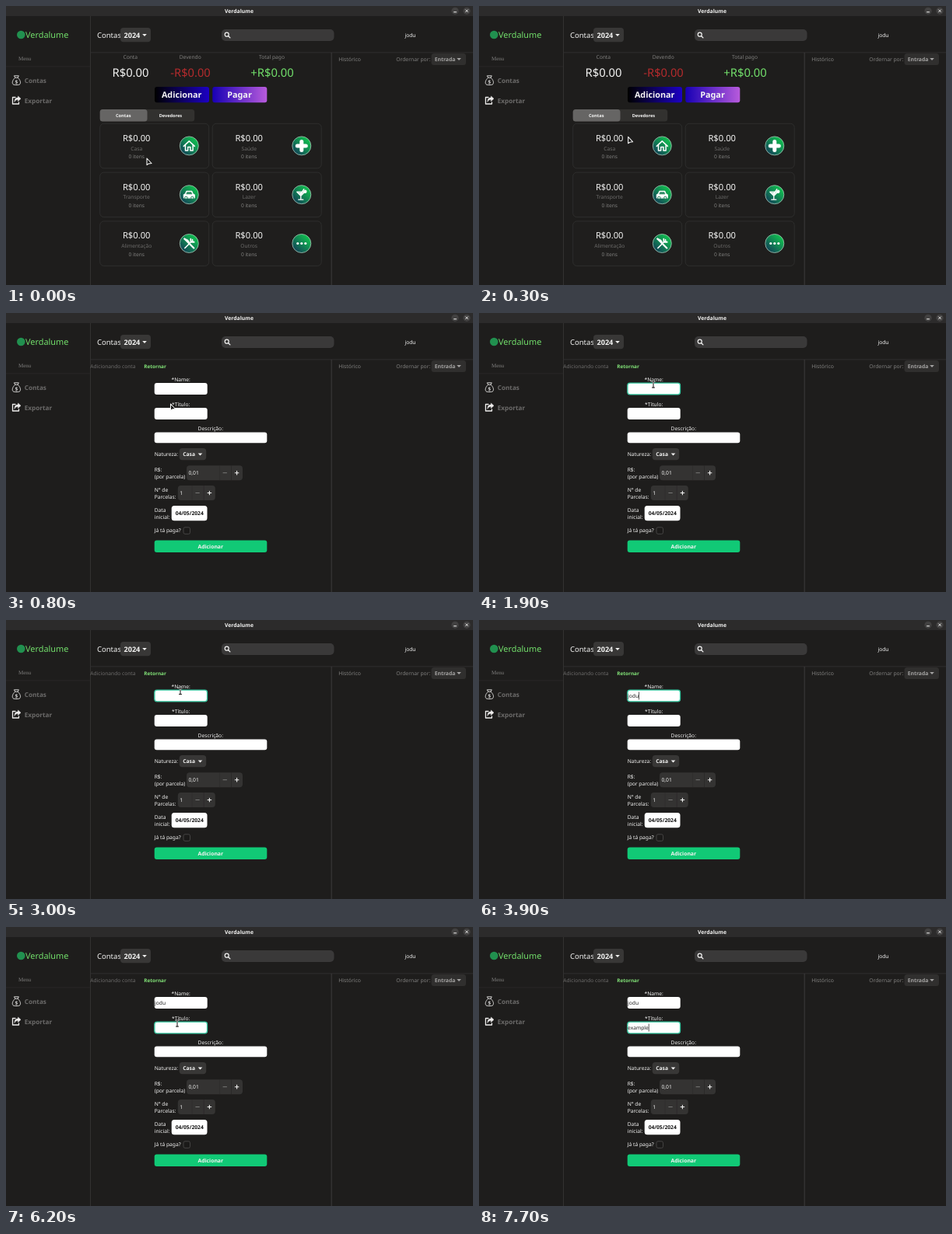
Animation of 600x359 px, one loop 8 s. Source, as an HTML page:

```html
<!DOCTYPE html>
<html lang="pt">
<head>
<meta charset="utf-8">
<style>
  html, body { margin: 0; width: 100%; height: 100%; overflow: hidden; background: #1e1d1c; }
  svg { display: block; width: 100%; height: 100%; }
  text { font-family: "Noto Sans", sans-serif; text-rendering: geometricPrecision; white-space: pre; }
</style>
</head>
<body>
<svg id="stage" viewBox="0 0 600 359" xmlns="http://www.w3.org/2000/svg"></svg>
<script>
const WHITE = '#f4f4f3', GREY = '#81807f', DIM = '#6c6b6a', BUTTON = '#383736', GREEN = '#72df6b';
const APP = 'Verdalume', USER = 'jodu', TITLE = 'example';

const rect = (x, y, w, h, fill, r = 0, extra = '') =>
  `<rect x="${x}" y="${y}" width="${w}" height="${h}" rx="${r}" fill="${fill}" ${extra}/>`;
const circle = (x, y, r, fill, extra = '') =>
  `<circle cx="${x}" cy="${y}" r="${r}" fill="${fill}" ${extra}/>`;
const path = (d, stroke = WHITE, width = 1, fill = 'none') =>
  `<path d="${d}" stroke="${stroke}" stroke-width="${width}" fill="${fill}" stroke-linejoin="round" stroke-linecap="round"/>`;
const text = (x, y, str, { size = 6.7, fill = WHITE, bold, mid, extra = '' } = {}) =>
  `<text x="${x}" y="${y}" font-size="${size}" fill="${fill}" font-weight="${bold ? 700 : 400}" text-anchor="${mid ? 'middle' : 'start'}" ${extra}>${str}</text>`;
const caretDown = (x, y, fill = WHITE) => `<path d="M${x - 2.8} ${y - 1.4}h5.6l-2.8 3z" fill="${fill}"/>`;
const group = (id, content) => `<g id="${id}">${content}</g>`;
const gradient = (id, coords, from, to) =>
  `<linearGradient id="${id}" ${coords}><stop stop-color="${from}"/><stop offset="1" stop-color="${to}"/></linearGradient>`;

function frameParts() {
  return rect(0, 0, 600, 359, '#1e1d1c') + rect(0, 0, 600, 13, '#2c2b2b')
    + text(299.5, 8.7, APP, { bold: 1, size: 6.8, mid: 1 })
    + circle(577, 6.3, 4.6, '#424141') + circle(592, 6.3, 4.6, '#424141')
    + path('M575.5 7.8h3') + path('M590.5 4.8l3 3m0-3l-3 3', WHITE, .9)
    + rect(108, 13, .8, 346, '#383736') + rect(0, 77.5, 108, .8, '#2b2a29')
    + rect(108, 59.5, 492, .8, '#343332') + rect(417.7, 60, .9, 299, '#41403f')
    + circle(19.3, 37, 5.3, '#21904f')
    + text(25, 41.3, APP, { size: 10.9, fill: GREEN })
    + text(16, 69.7, 'Menu', { size: 7, fill: GREY, extra: 'style="font-family:\'Liberation Serif\',serif"' })
    + path('M11.4 92.5c-4 3.5-4.5 9 0 9h4c4.500 0 4-5.500 0-9zM11.600 92l-1.200-2.200h6l-1.200 2.200', '#d5d4d3', 1)
    + text(13.4, 99.9, '$', { size: 6.5, mid: 1, bold: 1, fill: '#d5d4d3' })
    + path('M12 117.500H8.500v8.500h8v-2.200', '#eeedec', 1.3)
    + path('M11 123c0-4 2-5 4.500-5v-2l3.500 3.300-3.500 3.300v-2c-2 0-3.500.4-4.500 2.400z', '#eeedec', .5, '#eeedec')
    + text(23.700, 99.2, 'Contas', { size: 8.2, bold: 1, fill: DIM })
    + text(23.700, 124.500, 'Exportar', { size: 8.2, bold: 1, fill: DIM })
    + text(117, 41, 'Contas', { size: 9.5 })
    + rect(147, 28, 39, 18.3, BUTTON, 4) + text(151.5, 40.7, '2024', { size: 9.1, bold: 1 }) + caretDown(178, 37.4)
    + rect(277, 30, 144.500, 15, '#3a3939', 5)
    + circle(283.700, 36.700, 2.500, 'none', `stroke="${WHITE}" stroke-width="1.2"`) + path('M285.700 38.700l2.200 2.200', WHITE, 1.3)
    + text(519.500, 39.500, USER, { mid: 1 })
    + text(427.3, 70.800, 'Histórico', { fill: GREY, size: 6.8 })
    + text(501.3, 70.800, 'Ordernar por:', { fill: GREY, size: 6.75 })
    + rect(546.500, 61, 44.500, 15, '#302f2e', 3.500)
    + text(550.700, 70.800, 'Entrada', { bold: 1, size: 6.8, fill: '#a5a4a3' }) + caretDown(582, 68.4, '#a5a4a3');
}

const icons = {
  Casa: path('M-7 .5L0-6 7 .5M-4.800-.5V6H-1.600V1.500H1.600V6H4.800V-.5', '#fff', 1.5),
  'Saúde': path('M-5.500 0h11M0-5.500v11', '#fff', 5),
  Transporte: path('M-7 4v-4l2-1 1.500-3.500h7l1.500 3.500 2 1v4z', '#fff', 1, '#fff')
    + path('M-3.500-1l.8-2h5.400l.8 2z', '#147c50', .5, '#147c50') + circle(-4, 4, 1.6, '#fff', 'stroke="#147c50"') + circle(4, 4, 1.6, '#fff', 'stroke="#147c50"'),
  Lazer: path('M-6-3.500h10l-5 5zM-1 1v5M-4 6.500h6M-1-1l4-6', '#fff', 1.3)
    + path('M-4-2.500h6l-3 3z', '#fff', .5, '#fff') + circle(4.500, -4, 2.2, '#fff'),
  'Alimentação': path('M-6-6L6 6', '#fff', 2.2) + path('M-6-6c5 0 7 4 6 6z', '#fff', .5, '#fff')
    + path('M-5.500 6L3-2.500M2-6v4.500h4.500M4.200-5v2.700h2', '#fff', 1.6),
  Outros: [-5, 0, 5].map(x => circle(x, 0, 1.6, '#fff')).join('')
};

const card = ([name, icon], i) => {
  const x = 120.7 + i % 2 * 144.500, y = 151.3 + (i >> 1) * 62.8;
  return rect(x, y, 140, 57.500, '#1f1e1d', 5, 'stroke="#30302f" stroke-width=".9"')
    + text(x + 47, y + 22.500, 'R$0.00', { size: 11.2, mid: 1 })
    + text(x + 47, y + 34.3, name, { mid: 1, fill: DIM })
    + text(x + 47, y + 44.700, '0 itens', { mid: 1, fill: GREY, size: 6.600 })
    + circle(x + 114.600, y + 28.600, 12, 'url(#badge)', 'stroke="#a9c9b8" stroke-width=".8"')
    + `<g transform="translate(${x + 114.600} ${y + 28.600})">${icon}</g>`;
};

function overview() {
  return [['Conta', 159.700], ['Devendo', 236.700], ['Total pago', 341.500]]
      .map(([label, x]) => text(x, 67.800, label, { mid: 1, fill: GREY })).join('')
    + text(160, 90.500, 'R$0.00', { size: 14.800, mid: 1 })
    + text(237, 90.500, '-R$0.00', { size: 14.700, mid: 1, fill: '#b42b2d' })
    + text(342, 90.500, '+R$0.00', { size: 14.800, mid: 1, fill: GREEN })
    + rect(191, 104, 70, 20.3, 'url(#add)', 3) + rect(191, 104, 70, 20.3, '#000', 3, 'id="hover"')
    + rect(265.3, 104, 70, 20.3, 'url(#pay)', 3)
    + text(225.700, 118, 'Adicionar', { size: 10.8, bold: 1, mid: 1 })
    + text(300, 118, 'Pagar', { size: 10.8, bold: 1, mid: 1 })
    + rect(120.700, 133, 121.500, 15.500, '#32312f', 3.500) + rect(120.700, 133, 60.800, 15.500, '#666564', 3.500)
    + text(150.700, 142.800, 'Contas', { size: 5.700, bold: 1, mid: 1 })
    + text(211.3, 142.800, 'Devedores', { size: 5.600, bold: 1, mid: 1 })
    + Object.entries(icons).map(card).join('');
}

const entry = (y, id) => rect(190.700, y, 68, 15, '#fff', 3)
  + rect(190.900, y + .2, 67.600, 14.600, 'none', 3, `id="${id}Ring" stroke="#35c7a0" stroke-width="1.3"`)
  + text(191, y + 9.800, '', { fill: '#222', extra: `id="${id}Text"` })
  + rect(0, y + 2.500, .7, 10, '#111', 0, `id="${id}Caret"`);

const spinner = (x, y, w, value) => rect(x, y, w, 19, '#343332', 4)
  + rect(x + w - 15, y, .7, 19, '#282726') + rect(x + w - 30, y, .7, 19, '#2d2c2b')
  + text(x + 2.500, y + 12, value)
  + path(`M${x + w - 25} ${y + 9.500}h4.500`, GREY, .9)
  + path(`M${x + w - 9.700} ${y + 9.500}h4.600m-2.300-2.300v4.600`, WHITE, 1.1);

function form() {
  return text(108.3, 70.800, 'Adicionando conta', { fill: DIM, size: 6.65 })
    + text(177.3, 70.800, 'Retornar', { fill: '#82e378', bold: 1, size: 6.4 })
    + text(224.700, 88, '*Name:', { mid: 1 }) + entry(90, 'name')
    + text(224.700, 119.700, '*Título:', { mid: 1 }) + entry(122, 'title')
    + text(262.800, 151.3, 'Descrição:', { mid: 1 }) + rect(190.700, 153.500, 144.600, 13.700, '#fff', 3)
    + text(190.700, 184.3, 'Natureza:') + rect(222.700, 174, 34.500, 15.3, BUTTON, 4)
    + text(227.3, 184.3, 'Casa', { bold: 1 }) + caretDown(249.500, 181.800)
    + text(190.700, 204.2, 'R$:') + text(190.700, 213.3, '(por parcela)') + spinner(232, 196.2, 72, '0,01')
    + text(190.700, 229.700, 'N° de') + text(190.700, 238.800, 'Parcelas:') + spinner(220.800, 222, 48, '1')
    + text(190.700, 255.500, 'Data') + text(190.700, 264.700, 'inicial:')
    + rect(212.700, 248, 45.800, 19.3, '#fff', 3.500) + text(235.700, 260.2, '04/05/2024', { bold: 1, mid: 1, fill: '#111' })
    + text(190.700, 282.4, 'Já tá paga?') + rect(228, 275.800, 8.500, 8.500, '#1b1a19', 2, 'stroke="#4a4948" stroke-width=".9"')
    + rect(190.700, 292.500, 144.600, 15.500, '#11c976', 3) + text(262.800, 302.700, 'Adicionar', { bold: 1, mid: 1, size: 6.800 });
}

const stage = document.getElementById('stage');
stage.innerHTML = '<defs>'
  + gradient('add', '', '#000', '#1c00c4') + gradient('pay', '', '#1800b4', '#b85bdc')
  + gradient('badge', 'x1=".85" y1=".1" x2=".1" y2=".9"', '#10c44f', '#123f58') + '</defs>'
  + frameParts() + group('overview', overview()) + group('form', form())
  + group('arrow', path('M0 0v8.500l2.200-1.600 3.800-.4z', WHITE, 1.1, '#111'))
  + group('beam', path('M-1.500-4h3M0-4v8M-1.500 4h3', '#fff', 2) + path('M-1.500-4h3M0-4v8M-1.500 4h3', '#111', 1));

const el = id => document.getElementById(id);
const show = (id, on) => el(id).setAttribute('visibility', on ? 'visible' : 'hidden');
const fade = (t, start, length = 200) => Math.min(1, Math.max(0, (t - start) / length));

// [time, x, y] of the pointer's hot spot
const pointerPath = [[0, 181, 196], [100, 181, 196], [600, 211, 118], [700, 211.500, 117], [1200, 211.500, 117],
  [1400, 224, 92], [4700, 224, 91], [5000, 220, 124]];
const nameKeys = [3300, 3500, 3700, 3900];
const titleKeys = [6500, 6700, 6900, 7100, 7300, 7500, 7700];

function pointerAt(t) {
  const next = pointerPath.findIndex(p => p[0] > t);
  if (next < 0) return pointerPath.at(-1).slice(1);
  const [t0, x0, y0] = pointerPath[next - 1], [t1, x1, y1] = pointerPath[next];
  const k = (t - t0) / (t1 - t0), eased = k * k * (3 - 2 * k);
  return [x0 + (x1 - x0) * eased, y0 + (y1 - y0) * eased];
}

function typeInto(id, value, keys, t, formOpen) {
  const count = keys.filter(k => k <= t).length;
  const label = el(id + 'Text');
  label.textContent = value.slice(0, count);
  const caretOn = formOpen && count > 0 && t < keys.at(-1) + 400;
  show(id + 'Caret', caretOn);
  if (caretOn) el(id + 'Caret').setAttribute('x', 191 + label.getComputedTextLength());
}

function draw(t) {
  const formOpen = t >= 800;
  show('overview', !formOpen);
  show('form', formOpen);
  el('hover').setAttribute('opacity', fade(t, 500));
  el('nameRing').setAttribute('opacity', fade(t, 1500) - fade(t, 5300));
  el('titleRing').setAttribute('opacity', fade(t, 5300));
  typeInto('name', USER, nameKeys, t, formOpen);
  typeInto('title', TITLE, titleKeys, t, formOpen);

  const at = `translate(${pointerAt(t)})`;
  const hidden = (t >= nameKeys[0] && t < 4700) || t >= titleKeys[0];
  el('arrow').setAttribute('transform', at);
  el('beam').setAttribute('transform', at);
  show('arrow', t < 1400);
  show('beam', t >= 1400 && !hidden);
}

function tick() {
  draw(performance.now() % 8000);
  requestAnimationFrame(tick);
}
tick();
</script>
</body>
</html>
```
